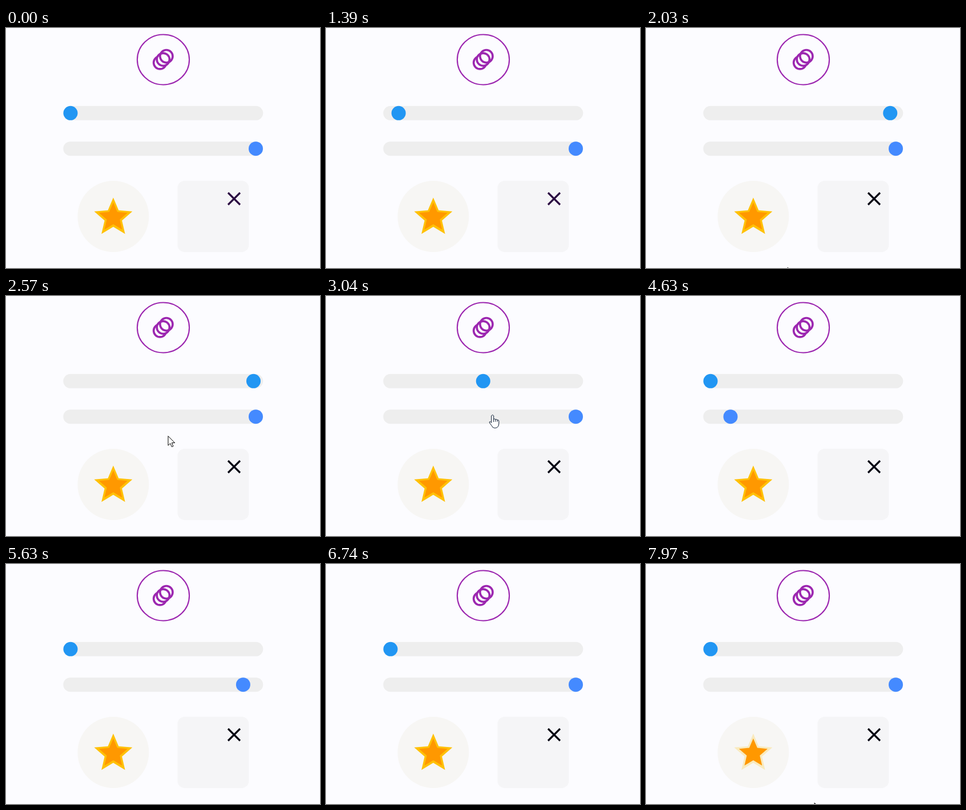
These frames come from a looping animation (550x421 px, 8000 ms). An HTML page:

```html
<!DOCTYPE html>
<html lang="en">
<head>
<meta charset="utf-8">
<title>Animated controls</title>
<style>
  html, body { margin: 0; height: 100%; overflow: hidden; background: #fcfcff; }
  svg { display: block; width: 100vw; height: 100vh; }
</style>
</head>
<body>
<svg viewBox="0 0 550 421">
  <g fill="none" stroke="#9c27b0">
    <ellipse cx="275.5" cy="55.5" rx="45.6" ry="44" stroke-width="2.1"/>
    <g stroke-width="3.6">
      <circle cx="269.7" cy="60.8" r="11.1"/>
      <circle cx="275.3" cy="55.2" r="11.1" fill="#fcfcff"/>
      <circle cx="280.9" cy="49.6" r="11.1"/>
    </g>
  </g>

  <g fill="#eee">
    <rect x="100.3" y="136.8" width="350" height="25" rx="12.5"/>
    <rect x="100.3" y="199.2" width="350" height="25" rx="12.5"/>
  </g>
  <circle id="bounceKnob" cy="149.3" r="12.5" fill="#2196f3"/>
  <circle id="easeKnob" cy="211.7" r="12.5" fill="#448aff"/>

  <circle cx="187.9" cy="330.5" r="62.5" fill="#f7f6f4"/>
  <polygon id="halo" fill="#ffc107"/>
  <polygon id="star" fill="#ff9800"/>

  <rect x="300.4" y="268" width="125" height="125" rx="12.5" fill="#f5f5f7"/>
  <path id="cross" d="M389 289l21 21m0-21l-21 21" stroke-width="3.2"/>

  <g id="cursor" fill="#fff" stroke="#0a1a30" stroke-linejoin="round">
    <path id="arrow" stroke="#000" d="M0 0v16.5l3.8-3.6 2.6 6 2.6-1.1-2.6-5.9h5.3z"/>
    <path id="hand" d="M-2 2Q0-1 2 2V8q2-1 3.300.6 2-.8 3.200.8 2.400-.4 2.600 2V16q-.5 7-6 7.500H3q-3-.4-4.500-4L-5.500 14q0-2 1.500-1.700l2 2zM2 8v5M5.300 8.600v4M8.500 9.400v3.200"/>
  </g>
</svg>
<script>
const LOOP = 8000, LEFT = 113, RIGHT = 437.5, BOTTOM = 421, EXIT = 300;
const $ = id => document.getElementById(id);
const clamp = v => Math.max(0, Math.min(1, v));
const mix = (a, b, u) => a + (b - a) * u;
const smooth = u => (u = clamp(u), u * u * (3 - 2 * u));

// Rises from `start`, then runs backwards until `end`.
const pingPong = (t, start, end, back) =>
  clamp(Math.min((t - start) / 1000, (end - t) / back));

// Parabolic arcs, each half as wide as the one before
function bounceOut(u) {
  let x = u * 2.75, mid = 0, half = 1;
  while (x > mid + half && half > 0.125) {
    mid += 1.5 * half;
    half /= 2;
  }
  return (x - mid) ** 2 + 1 - half * half;
}

// cubic-bezier(.42, 0, .58, 1), solved by bisection
function easeInOut(u) {
  let lo = 0, hi = 1, s;
  for (let i = 0; i < 20; i++) {
    s = (lo + hi) / 2;
    const x = 1.26 * (1 - s) ** 2 * s + 1.74 * (1 - s) * s * s + s ** 3;
    if (x < u) lo = s; else hi = s;
  }
  return s * s * (3 - 2 * s);
}

function starPoints(cx, cy, radius) {
  return Array.from({ length: 10 }, (_, i) => {
    const r = i % 2 ? radius * 0.455 : radius, a = i * Math.PI / 5;
    return [cx + r * Math.sin(a), cy - r * Math.cos(a)];
  }).join(" ");
}

// The pointer glides up from the bottom edge to a control, rests and drops away.
const visits = [
  { enter: 350, arrive: 1000, leave: 1080, edge: 256, x: 150, y: 140 },
  { enter: 2000, arrive: 2780, leave: 3530, edge: 248, x: 291.7, y: 208 },
  { enter: 5640, arrive: 6070, leave: 6430, edge: 250, x: 193.5, y: 337 },
  { enter: 7940, arrive: 8340, leave: 9000, edge: 294, x: 360, y: 300 }
];

function pointerAt(t) {
  const v = visits.find(v => t > v.enter && t < v.leave + EXIT);
  if (!v) return null;
  const u = smooth((t - v.enter) / (v.arrive - v.enter)) * (1 - smooth((t - v.leave) / EXIT));
  return [mix(v.edge, v.x, u), mix(BOTTOM, v.y, u)];
}

function isOverControl(x, y) {
  const inBox = (l, top, w, h) => x > l && x < l + w && y > top && y < top + h;
  return inBox(100, 137, 350, 25) || inBox(100, 199, 350, 25) ||
    inBox(300, 268, 125, 125) || Math.hypot(x - 188, y - 330.5) < 62.5;
}

function show(el, on) {
  el.setAttribute("visibility", on ? "visible" : "hidden");
}

function draw(t) {
  const first = bounceOut(pingPong(t, 1315, 3293, 980));
  const second = easeInOut(pingPong(t, 3860, 5805, 950));
  $("bounceKnob").setAttribute("cx", mix(LEFT, RIGHT, first));
  $("easeKnob").setAttribute("cx", mix(RIGHT, LEFT, second));
  $("halo").setAttribute("opacity", 1 - pingPong(t, 6740, 8740, 1000));
  $("cross").setAttribute("stroke", t < 1700 ? "#2b0c42" : "#050614");

  const p = pointerAt(t), over = p && isOverControl(...p);
  show($("arrow"), p && !over);
  show($("hand"), over);
  if (p) $("cursor").setAttribute("transform", `translate(${p})`);
}

$("halo").setAttribute("points", starPoints(187.9, 332.7, 35.2));
$("star").setAttribute("points", starPoints(187.9, 332.3, 26.3));

const start = performance.now();
function tick() {
  draw((performance.now() - start) % LOOP);
  requestAnimationFrame(tick);
}
tick();
</script>
</body>
</html>
```
